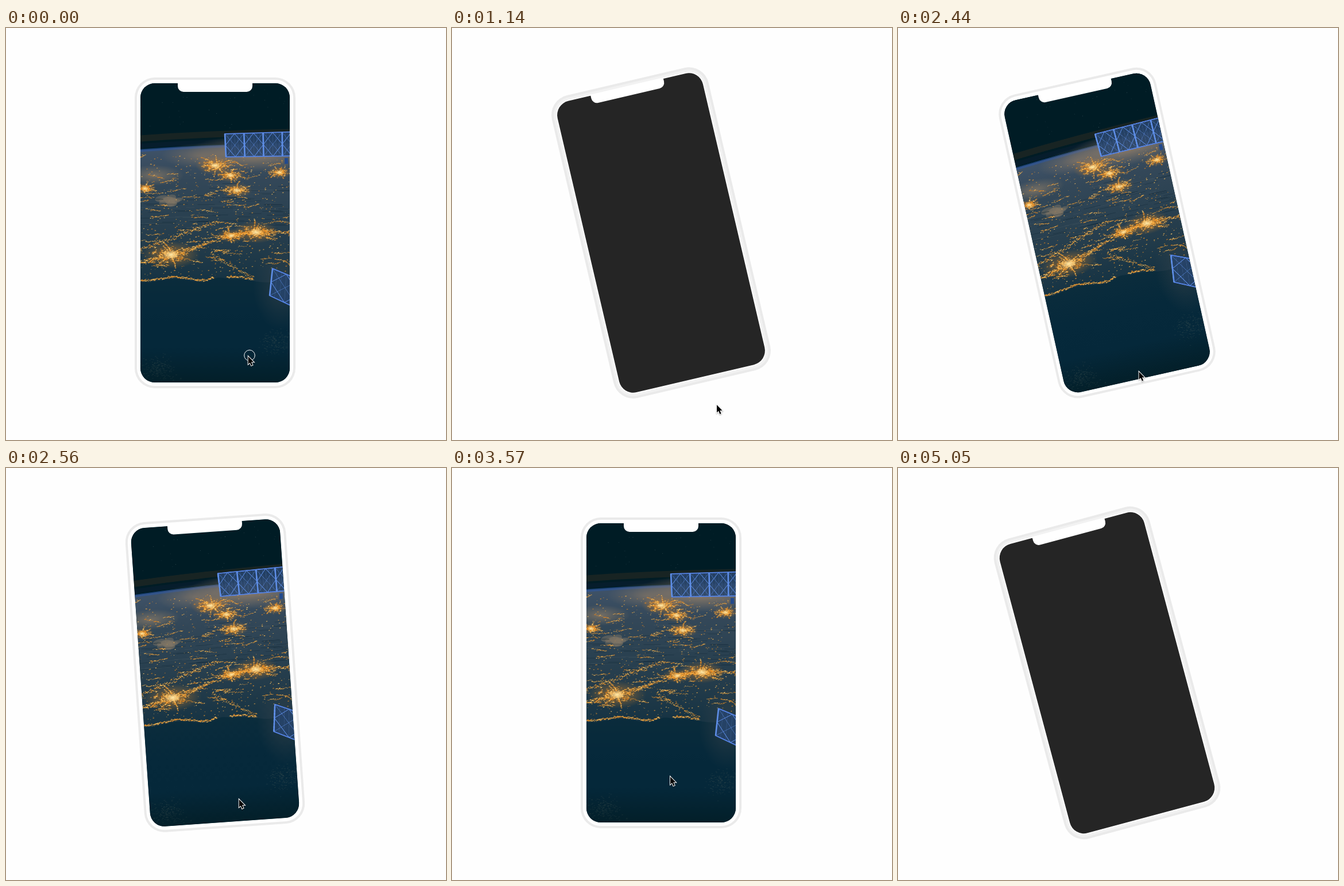
An HTML page with a canvas for the animation above (5.59 s loop, 766 px wide and 716 px high).

```html
<!DOCTYPE html>
<html lang="en">
<head>
<meta charset="utf-8">
<title>Tilting phone</title>
<style>
  html, body { margin: 0; width: 100%; height: 100%; overflow: hidden; background: #fefefe; }
  canvas { display: block; width: 766px; height: 716px; }
</style>
</head>
<body>
<canvas id="stage"></canvas>
<script>
const W = 766, H = 716, LOOP = 5590;
const PHONE = { x: 224, y: 86, w: 280, h: 540, r: 35 };
const BEZEL = 10, TILT = -15, TURN = 400;
const LEAVE_1 = 904, ENTER = 2386, LEAVE_2 = 4100, CURSOR_GONE = 4720;

const dpr = window.devicePixelRatio || 1;
const canvas = document.getElementById('stage');
canvas.width = W * dpr;
canvas.height = H * dpr;
const ctx = canvas.getContext('2d');

const clamp = k => Math.min(1, Math.max(0, k));
const mix = (a, b, k) => a + (b - a) * k;
const linear = k => k;
const easeIn = k => k * k;
const easeInOut = k => k * k * (3 - 2 * k);

// Pointer strokes between resting points
const REST = { screen: [421, 570], below: [471, 677], back: [379, 535], edge: [420, 628], out: [575, 713] };
const strokes = [
  { from: REST.screen, to: REST.below, start: 60, end: 1600, curve: easeInOut },
  { from: REST.below, to: REST.back, start: 1815, end: 2965, curve: easeInOut },
  { from: REST.back, to: REST.edge, start: 3520, end: 4110, curve: easeIn },
  { from: REST.edge, to: REST.out, start: 4110, end: CURSOR_GONE, curve: linear }
];

function pointerAt(t) {
  const { from, to, start, end, curve } = strokes.findLast(s => t >= s.start) || strokes[0];
  const k = curve(clamp((t - start) / (end - start)));
  return [mix(from[0], to[0], k), mix(from[1], to[1], k)];
}

// Same curve as the CSS "ease" timing function
function ease(x) {
  const bezier = (a, b, s) => 3 * a * s * (1 - s) ** 2 + 3 * b * s * s * (1 - s) + s ** 3;
  let lo = 0, hi = 1;
  for (let i = 0; i < 24; i++) {
    const s = (lo + hi) / 2;
    if (bezier(0.25, 0.25, s) < x) lo = s; else hi = s;
  }
  return bezier(0.1, 1, lo);
}

const turn = (t, start) => ease(clamp((t - start) / TURN));
const tiltAt = t => TILT * (turn(t, LEAVE_1) - turn(t, ENTER) + turn(t, LEAVE_2));
const isLit = t => t < LEAVE_1 || (t >= ENTER && t < LEAVE_2);

function seeded(seed) {
  return () => {
    seed = (seed + 0x6D2B79F5) | 0;
    let r = Math.imul(seed ^ (seed >>> 15), 1 | seed);
    r = (r + Math.imul(r ^ (r >>> 7), 61 | r)) ^ r;
    return ((r ^ (r >>> 14)) >>> 0) / 4294967296;
  };
}

function polygon(c, points) {
  c.beginPath();
  points.forEach(p => c.lineTo(...p));
  c.closePath();
}

// Night view of a planet, painted once
function paintScene() {
  const left = 234, right = 494, top = 96, bottom = 616;
  const img = document.createElement('canvas');
  const scale = 2 * dpr;
  img.width = (right - left) * scale;
  img.height = (bottom - top) * scale;
  const c = img.getContext('2d');
  c.scale(scale, scale);
  c.translate(-left, -top);

  const rnd = seeded(41);
  const between = (a, b) => mix(a, b, rnd());
  const gauss = () => (rnd() + rnd() + rnd() + rnd() - 2) * 0.9;
  const repeat = (n, draw) => { for (let i = 0; i < n; i++) draw(i); };

  const fadeDown = (y0, y1, ...colours) => {
    const g = c.createLinearGradient(0, y0, 0, y1);
    colours.forEach((col, i) => g.addColorStop(i / (colours.length - 1), col));
    return g;
  };
  const haze = (x, y, rx, ry, rgb, alpha) => {
    c.save();
    c.translate(x, y);
    c.scale(rx, ry);
    const g = c.createRadialGradient(0, 0, 0, 0, 0, 1);
    g.addColorStop(0, `rgba(${rgb},${alpha})`);
    g.addColorStop(1, `rgba(${rgb},0)`);
    c.fillStyle = g;
    c.fillRect(-1, -1, 2, 2);
    c.restore();
  };
  const blob = (x, y, rx, ry, fill) => {
    c.beginPath();
    c.ellipse(x, y, rx, ry, -0.15, 0, 7);
    c.fillStyle = fill;
    c.fill();
  };

  // Sky and stars
  c.fillStyle = '#001c25';
  c.fillRect(left, top, right - left, bottom - top);
  repeat(32, () => {
    c.fillStyle = `rgba(150,175,180,${between(0.1, 0.45)})`;
    c.fillRect(between(left, right), between(100, 176), 0.8, 0.8);
  });

  // Globe under a thin airglow
  const horizon = (y, width, colour) => {
    c.beginPath();
    c.moveTo(left, y);
    c.quadraticCurveTo(340, y - 8, right, y - 11);
    c.lineWidth = width;
    c.strokeStyle = colour;
    c.stroke();
  };
  horizon(192, 11, 'rgba(48,45,35,.5)');
  horizon(205, 8, '#061d2c');
  horizon(213, 2, '#37506f');
  c.lineTo(right, bottom);
  c.lineTo(left, bottom);
  c.fillStyle = fadeDown(203, 435, '#41546a', '#344859', '#2b4252', '#243c4b', '#173444');
  c.fill();
  horizon(213, 5, 'rgba(42,86,164,.55)');

  // Sea with a ragged coast
  const coast = x => 439 + 3 * Math.sin(x / 17) - 6 * Math.exp(-(((x - 368) / 16) ** 2));
  c.beginPath();
  c.moveTo(left, bottom);
  for (let x = left; x <= right; x += 2) c.lineTo(x, coast(x));
  c.lineTo(right, bottom);
  c.fillStyle = fadeDown(435, bottom, '#0b2c3c', '#06293b', '#05283a', '#031f29');
  c.fill();

  // Cloud and dusk glow
  haze(430, 218, 115, 32, '166,136,103', 0.8);
  haze(340, 222, 70, 22, '140,122,102', 0.6);
  haze(258, 256, 52, 18, '150,130,105', 0.65);
  haze(480, 450, 50, 75, '62,70,76', 0.55);
  repeat(14, () => blob(284 + gauss() * 15, 301 + gauss() * 6, between(5, 13), between(3, 6), 'rgba(127,117,101,.5)'));
  repeat(110, () => {
    c.fillStyle = rnd() < 0.6 ? 'rgba(9,33,47,.35)' : 'rgba(99,112,114,.2)';
    c.fillRect(between(left - 20, right), between(270, 350), between(10, 40), 0.9);
  });

  // Town lights: a bright core in an orange bloom
  const light = (x, y, size) => {
    const heat = rnd();
    blob(x, y, size * 2.8, size * 1.7, 'rgba(240,140,30,.2)');
    blob(x, y, size * between(1, 1.8), size * 0.75, `hsl(${mix(30, 46, heat)},${mix(75, 100, heat)}%,${mix(48, 80, heat)}%)`);
  };
  const road = (x, y, angle, length) => {
    for (let s = 0; s < length; s += between(1, 3.2)) {
      angle += gauss() * 0.18;
      x += Math.cos(angle) * 2;
      y += Math.sin(angle);
      if (y > 218 && y < coast(x) - 2) light(x, y + gauss(), between(0.3, 0.8));
    }
  };
  const city = (x, y, size) => {
    haze(x, y, size * 1.7, size * 0.8, '255,150,30', 0.5);
    repeat(8, i => road(x, y, i * Math.PI / 4 + gauss() * 0.4, size * between(1, 2)));
    repeat(size * 6, () => light(x + gauss() * size, y + gauss() * size * 0.42, between(0.4, 1)));
    haze(x, y, size * 0.5, size * 0.28, '255,240,180', 0.9);
  };

  repeat(620, () => light(between(left, right), between(220, 432), between(0.25, 0.7)));
  repeat(75, () => road(between(left - 20, right), between(222, 415), between(-0.35, 0.2), between(8, 36)));
  for (let x = left; x < right; x += 0.8) {
    light(x, 405 - 50 * easeInOut(clamp((x - left) / 200)) + gauss() * 4, between(0.3, 1));
    if (x < 370) light(x, 385 - (x - left) * 0.37 + gauss() * 4, between(0.3, 0.8));
    if (x < 362 || (x > 385 && x < 430)) light(x, coast(x) - 3 + gauss() * 2, between(0.3, 0.9));
    if (x > 356 && x < 432) light(x, 392 + (x - 356) * 0.58 + gauss() * 4, between(0.3, 0.75));
  }
  [[287, 394, 30], [435, 355, 24], [392, 361, 15], [364, 239, 20],
   [402, 282, 16], [391, 256, 15], [476, 251, 13], [242, 279, 12]].forEach(p => city(...p));

  // Faint cloud grain over the sea
  repeat(400, i => {
    const [x, y] = i % 2 ? [264, 592] : [472, 545];
    c.fillStyle = 'rgba(94,105,94,.2)';
    c.fillRect(x + gauss() * 28, y + gauss() * 20, between(1, 3), 0.9);
  });

  // Solar wings: corners clockwise from top left, split into braced cells
  const wing = ([a, b, d, e], cells) => {
    const at = (u, v) => [0, 1].map(i => mix(mix(a[i], b[i], u), mix(e[i], d[i], u), v));
    const rod = (p, q, width) => {
      c.beginPath();
      c.moveTo(...p);
      c.lineTo(...q);
      c.lineWidth = width;
      c.stroke();
    };
    polygon(c, [a, b, d, e]);
    c.fillStyle = 'rgba(38,68,108,.88)';
    c.fill();
    c.strokeStyle = '#5583e6';
    c.lineWidth = 1.8;
    c.stroke();
    repeat(cells, i => {
      const u = i / cells, w = (i + 1) / cells, m = (u + w) / 2;
      c.strokeStyle = 'rgba(96,139,195,.4)';
      repeat(6, j => rod(at(mix(u, w, j / 6), 0), at(mix(u, w, j / 6), 1), 0.5));
      c.strokeStyle = '#5f8fe8';
      [0, 1].forEach(v => {
        rod(at(u, 0.5), at(m, v), 0.9);
        rod(at(m, v), at(w, 0.5), 0.9);
        rod(at(u, v), at(w, 1 - v), 0.5);
      });
      rod(at(u, 0), at(u, 1), 2.6);
    });
  };
  wing([[381, 184], [514, 180], [514, 222], [383, 224]], 4);
  wing([[464, 418], [512, 438], [510, 489], [459, 465]], 1);
  c.fillStyle = '#234a8c';
  c.fillRect(485, 226, 6, 10);
  return img;
}

const scene = paintScene();

function panel(inset, fill) {
  const { x, y, w, h, r } = PHONE;
  ctx.beginPath();
  ctx.roundRect(x + inset, y + inset, w - 2 * inset, h - 2 * inset, r - inset);
  ctx.fillStyle = fill;
  ctx.fill();
}

function drawPhone(t) {
  const { x, y, w, h } = PHONE;
  const cx = x + w / 2, cy = y + h / 2;
  const lit = isLit(t);
  ctx.save();
  ctx.translate(cx, cy);
  ctx.rotate(tiltAt(t) * Math.PI / 180);
  ctx.translate(-cx, -cy);
  panel(0, '#eaeaea');
  panel(4, lit ? '#ffffff' : '#f2f2f2');
  panel(8, '#ffffff');
  panel(BEZEL, lit ? '#001c25' : '#252525');
  if (lit) {
    ctx.save();
    ctx.clip();
    ctx.drawImage(scene, x + BEZEL, y + BEZEL, w - 2 * BEZEL, h - 2 * BEZEL);
    ctx.restore();
  }
  ctx.beginPath();
  ctx.roundRect(cx - 65, y + 9, 130, 16, [0, 0, 10, 10]);
  ctx.fillStyle = '#ffffff';
  ctx.fill();
  ctx.restore();
}

function drawPointer(t) {
  if (t >= CURSOR_GONE) return;
  const [x, y] = pointerAt(t);
  ctx.strokeStyle = '#ffffff';
  if (t < strokes[0].start) {
    ctx.beginPath();
    ctx.arc(x + 3, y - 1, 9.3, 0, 7);
    ctx.lineWidth = 1;
    ctx.stroke();
  }
  ctx.save();
  ctx.translate(x + 0.7, y + 0.8);
  polygon(ctx, [[0, 0], [0, 13.4], [3, 10.6], [5.3, 16], [7.6, 15], [5.3, 9.8], [9.6, 9.8]]);
  ctx.shadowColor = 'rgba(0,0,0,.35)';
  ctx.shadowBlur = 2 * dpr;
  ctx.shadowOffsetY = dpr;
  ctx.lineWidth = 2;
  ctx.stroke();
  ctx.shadowColor = 'transparent';
  ctx.fillStyle = '#000000';
  ctx.fill();
  ctx.restore();
}

const began = performance.now();
function frame() {
  const t = (performance.now() - began) % LOOP;
  ctx.setTransform(dpr, 0, 0, dpr, 0, 0);
  ctx.fillStyle = '#fefefe';
  ctx.fillRect(0, 0, W, H);
  drawPhone(t);
  drawPointer(t);
  requestAnimationFrame(frame);
}
frame();
</script>
</body>
</html>
```
